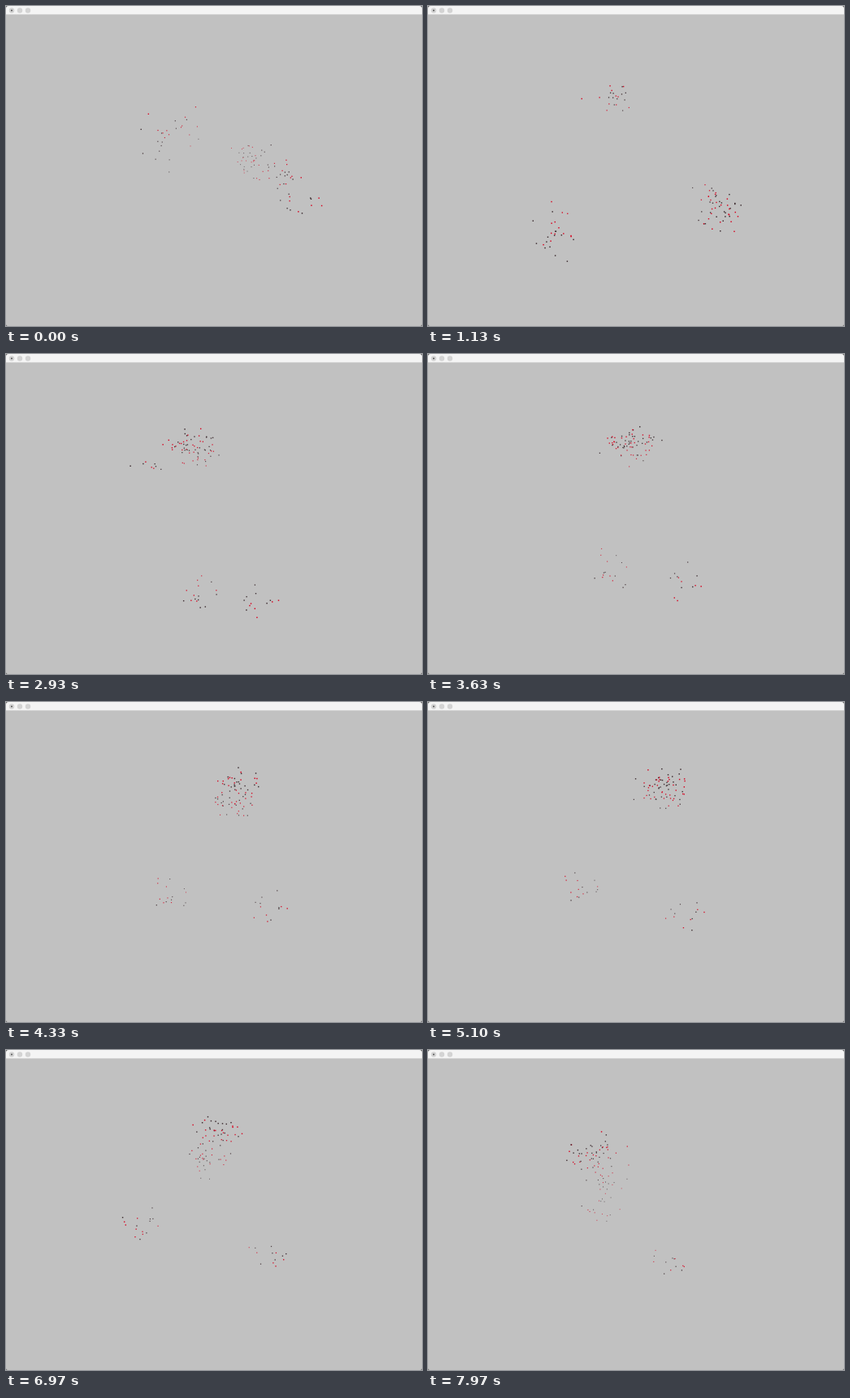
Animation, 512 px wide and 395 px high, one loop 8 s. Source, as an HTML page with a canvas:

```html
<!DOCTYPE html>
<html lang="en">
<head>
<meta charset="utf-8">
<title>Swarm</title>
<style>
  html, body { margin: 0; width: 100%; height: 100%; overflow: hidden; background: #555; }
  canvas { display: block; width: 512px; height: 395px; border-radius: 3px 3px 2px 2px; }
</style>
</head>
<body>
<canvas width="512" height="395"></canvas>
<script>
const ctx = document.querySelector('canvas').getContext('2d');
const LOOP = 8000, CENTER_X = 256, CENTER_Y = 203;

// Every flock flies a smooth path through one waypoint per time.
const TIMES = [0, 1130, 2930, 4330, 5870, 6970, 8000];
const FLOCKS = [
  { count: 40, spread: 21, path: [[302, 191], [357, 246], [232, 116], [278, 126], [290, 101], [262, 100], [198, 131]] },
  { count: 22, spread: 22, path: [[334, 207], [225, 113], [218, 116], [283, 98], [288, 106], [246, 136], [217, 163]] },
  { count: 16, spread: 19, path: [[218, 149], [154, 287], [236, 297], [200, 239], [176, 227], [163, 218], [212, 196]] },
  { count: 13, spread: 20, path: [[363, 243], [358, 265], [312, 305], [325, 252], [307, 277], [320, 255], [288, 267]] },
  { count: 11, spread: 24, path: [[190, 165], [158, 275], [182, 136], [285, 106], [250, 106], [244, 134], [220, 120]] }
];

let seed = 4711;
function random() {
  seed = (seed * 16807) % 2147483647;
  return seed / 2147483647;
}
const between = (low, high) => low + (high - low) * random();
const bell = () => random() + random() + random() - 1.5;

const dots = FLOCKS.flatMap(({ count, spread, path }) =>
  Array.from({ length: count }, (_, i) => ({
    path,
    lag: bell() * 260,
    radius: spread * 1.15 * random() ** 0.7,
    angle: between(0, 2 * Math.PI),
    turn: between(-0.0006, 0.0006),
    color: i % 2 ? '#d8001e' : '#3a2a2e'
  })));

function velocity(path, k, axis) {
  const a = Math.max(0, k - 1), b = Math.min(TIMES.length - 1, k + 1);
  return (path[b][axis] - path[a][axis]) / (TIMES[b] - TIMES[a]);
}

// Hermite spline; outside the loop the end segments carry on.
function along(path, t, axis) {
  let k = 0;
  while (k < TIMES.length - 2 && t >= TIMES[k + 1]) k++;
  const span = TIMES[k + 1] - TIMES[k];
  const u = (t - TIMES[k]) / span, v = 1 - u;
  return path[k][axis] * v * v * (1 + 2 * u)
    + path[k + 1][axis] * u * u * (3 - 2 * u)
    + span * u * v * (velocity(path, k, axis) * v - velocity(path, k + 1, axis) * u);
}

function drawDot(dot, t) {
  const angle = dot.angle + dot.turn * t;
  const x = along(dot.path, t - dot.lag, 0) + 1.15 * dot.radius * Math.cos(angle);
  const y = along(dot.path, t - dot.lag, 1) + 0.9 * dot.radius * Math.sin(angle);

  // Dots close to the centre are far away: smaller and paler.
  const distance = Math.hypot(x - CENTER_X, y - CENTER_Y);
  const near = Math.min(1, Math.max(0, (distance - 40) / 75));
  const size = 0.95 + 0.5 * near;
  ctx.globalAlpha = 0.65 + 0.35 * near;
  ctx.fillStyle = dot.color;
  ctx.fillRect(x - size / 2, y - size / 2, size, size);
}

function disc(x, y, r, color) {
  ctx.fillStyle = color;
  ctx.beginPath();
  ctx.arc(x, y, r, 0, 2 * Math.PI);
  ctx.fill();
}

function drawWindow() {
  ctx.globalAlpha = 1;
  ctx.fillStyle = '#c1c1c1';
  ctx.fillRect(0, 0, 512, 395);
  ctx.fillStyle = '#f4f4f4';
  ctx.fillRect(0, 0, 512, 10);
  ctx.fillStyle = '#d4d4d4';
  ctx.fillRect(0, 10, 512, 1);
  for (const x of [7, 17, 27]) disc(x, 5.5, 3.2, '#d3d3d3');
  disc(7, 5.5, 1, '#555');
}

const begin = performance.now();
function tick() {
  const t = (performance.now() - begin) % LOOP;
  drawWindow();
  for (const dot of dots) drawDot(dot, t);
  requestAnimationFrame(tick);
}
tick();
</script>
</body>
</html>
```
